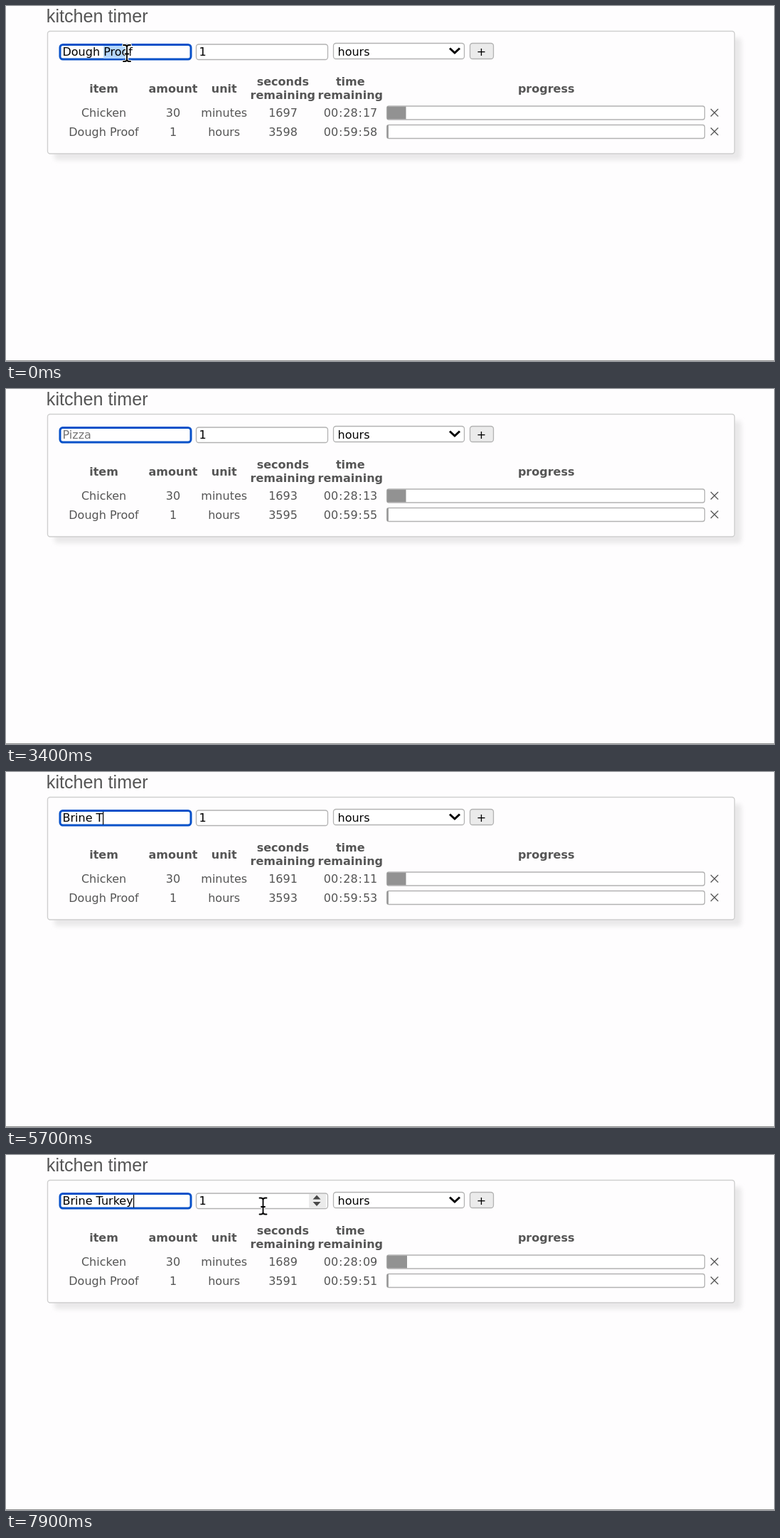
Recreate the animation shown at these times as an HTML page. Size 1080 by 500 pixels, loop 8 s.

```html
<!DOCTYPE html>
<html lang="en">
<head>
<meta charset="utf-8">
<title>kitchen timer</title>
<style>
  html, body { margin: 0; width: 100%; height: 100%; overflow: hidden; background: #fefdfe; }
  svg { display: block; }
  text { font: 16px "DejaVu Sans", Verdana, sans-serif; white-space: pre; }
  .title { font: 25.2px "Liberation Sans", Arial, sans-serif; fill: #555; }
  .head { font-weight: bold; fill: #555; text-anchor: middle; }
  .cell { fill: #555; text-anchor: middle; }
  .box { fill: #fff; stroke: #b2b2b2; stroke-width: 1.3; }
  .line { fill: none; }
</style>
</head>
<body>
<svg width="1080" height="500" viewBox="0 0 1080 500">
  <defs>
    <filter id="blur" x="-5%" y="-15%" width="110%" height="130%"><feGaussianBlur stdDeviation="3"/></filter>
    <path id="beam" d="M-5-11.5H-3Q0-11.5 0-8.5Q0-11.5 3-11.5H5M0-9V9M-5 11.5H-3Q0 11.5 0 8.5Q0 11.5 3 11.5H5M-2.5 1H2.5"/>
  </defs>
  <rect width="1080" height="500" fill="#fefdfe"/>
  <rect y="499" width="1080" height="1" fill="#8c8c8c"/>
  <text class="title" x="56.8" y="23">kitchen timer</text>

  <rect x="68" y="45" width="966" height="172" rx="4" fill="#e9e8e9" filter="url(#blur)"/>
  <rect x="58.5" y="35.5" width="966" height="172.5" rx="3.5" fill="#fefdfe" stroke="#cfcfcf" stroke-width="1.4"/>

  <rect x="76" y="54.5" width="184" height="20.5" rx="4" fill="#fff" stroke="#0751c9" stroke-width="3"/>
  <rect id="selection" y="56" height="18" fill="#b5d7fc"/>
  <text id="entry" x="79.5" y="70"></text>
  <rect id="caret" y="56" width="1.2" height="18"/>

  <rect class="box" x="267.5" y="54" width="185" height="21.5" rx="3.5"/>
  <text x="271.5" y="70">1</text>
  <g id="spinner" fill="#484848">
    <rect x="426" y="55" width="24" height="20" fill="#ebebeb"/>
    <path d="M431.500 62.500L437 56.500L442.500 62.500ZM431.500 66L437 72L442.500 66Z"/>
  </g>

  <rect class="box" x="460.500" y="52.500" width="184" height="22" rx="3.500"/>
  <text x="466.500" y="70">hours</text>
  <path class="line" d="M624 59.500L631 66L638 59.500" stroke="#000" stroke-width="3"/>
  <rect class="box" x="652.500" y="52.500" width="33" height="22" rx="3.500" style="fill:#ebebeb"/>
  <text x="668.500" y="70" text-anchor="middle">+</text>

  <g id="table"></g>

  <g id="pointer" class="line" stroke-linecap="round">
    <use href="#beam" stroke="#fff" stroke-width="4"/>
    <use href="#beam" stroke="#000" stroke-width="1.8"/>
  </g>
</svg>
<script>
const LOOP = 8000;
const $ = id => document.getElementById(id);
const entry = $('entry'), caret = $('caret'), selection = $('selection');

function add(tag, attributes, content = '') {
  const node = document.createElementNS('http://www.w3.org/2000/svg', tag);
  for (const name in attributes) node.setAttribute(name, attributes[name]);
  node.textContent = content;
  $('table').append(node);
  return node;
}
const label = (cls, x, y, content) => add('text', { class: cls, x, y }, content);

[[137.5, 121.5, 'item'], [235, 121.5, 'amount'], [306.7, 121.5, 'unit'],
 [389.3, 112, 'seconds'], [389.3, 131, 'remaining'],
 [484.3, 112, 'time'], [484.3, 131, 'remaining'], [759.7, 121.5, 'progress']]
  .forEach(([x, y, content]) => label('head', x, y, content));

function makeTimer(y, item, amount, unit, start, ticks) {
  label('cell', 137.5, y, item);
  label('cell', 235, y, amount);
  label('cell', 306.7, y, unit);
  const seconds = label('cell', 389.5, y);
  const digits = [-27.6, 0, 27.6].map(dx => label('cell', 484.5 + dx, y));
  for (const dx of [-13.8, 13.8]) label('cell', 484.5 + dx, y, ':');
  add('rect', { class: 'box', x: 535.5, y: y - 15, width: 447, height: 19, rx: 3 });
  const bar = add('rect', { x: 536, y: y - 14.4, height: 17.8, fill: '#929292' });
  add('path', { d: `M991 ${y - 11}l10.500 10.500m0-10.500l-10.500 10.500`, stroke: '#555', 'stroke-width': 1.3 });
  return { start, ticks, seconds, digits, bar };
}
const chicken = makeTimer(156, 'Chicken', 30, 'minutes', 1697,
  [200, 1300, 2300, 3200, 4200, 5200, 6200, 7200]);
const dough = makeTimer(182.5, 'Dough Proof', 1, 'hours', 3598,
  [800, 1600, 2700, 3700, 4700, 5800, 6800]);

function drawTimer(timer, t, barWidth) {
  const left = timer.start - timer.ticks.filter(tick => tick <= t).length;
  timer.seconds.textContent = left;
  [left / 3600, left / 60 % 60, left % 60].forEach((value, i) => {
    timer.digits[i].textContent = String(Math.floor(value)).padStart(2, '0');
  });
  timer.bar.setAttribute('width', barWidth);
}

const typing = [
  [0, 'Dough Proof'], [1300, 'B'], [2100, 'Br'], [2300, 'Bri'], [2500, 'Brin'],
  [3100, 'Bri'], [3200, 'Br'], [3300, 'B'], [3400, ''],
  [3600, 'B'], [3800, 'Br'], [4100, 'Bri'], [4200, 'Brin'], [4300, 'Brine'],
  [5200, 'Brine '], [5700, 'Brine T'], [5800, 'Brine Tu'], [6000, 'Brine Tur'],
  [6400, 'Brine Turk'], [6500, 'Brine Turke'], [6600, 'Brine Turkey']
];
const caretOff = [[0, 1300], [1700, 2000], [3400, 3600], [4700, 5200], [7100, 7600]];
const show = (node, visible) => node.setAttribute('visibility', visible ? 'visible' : 'hidden');

function drawEntry(t) {
  const value = typing.findLast(([time]) => time <= t)[1];
  entry.textContent = value || 'Pizza';
  entry.setAttribute('fill', value ? '#000' : '#757575');
  const end = 79.5 + entry.getComputedTextLength();
  caret.setAttribute('x', Math.floor(end + 0.4));
  show(caret, !caretOff.some(([from, to]) => t >= from && t < to));

  const from = t < 100 ? entry.getStartPositionOfChar(6).x : 79.5;
  const to = t < 100 ? 171 : end;
  selection.setAttribute('x', from);
  selection.setAttribute('width', to - from);
  show(selection, t < 1300);
}

function drawPointer(t) {
  let x = 170, y = 66.5;
  if (t >= 7400) {
    const p = 1 - (1 - (t - 7400) / 500) ** 2;
    x = t < 7900 ? 262.5 + 99 * p : 361.5;
    y = t < 7900 ? 64 + 8 * p : 72;
  } else if (t >= 7100) {
    const p = (t - 7100) / 300;
    x += 92.5 * p;
    y -= 2.5 * p;
  }
  $('pointer').setAttribute('transform', `translate(${x} ${y})`);
  show($('pointer'), t < 1300 || t >= 7100);
  show($('spinner'), t >= 7100 && x > 267);
}

function draw(now) {
  const t = now % LOOP;
  drawTimer(chicken, t, t < 5900 ? 26.5 : 28);
  drawTimer(dough, t, 1.8);
  drawEntry(t);
  drawPointer(t);
  requestAnimationFrame(draw);
}
requestAnimationFrame(draw);
</script>
</body>
</html>
```
